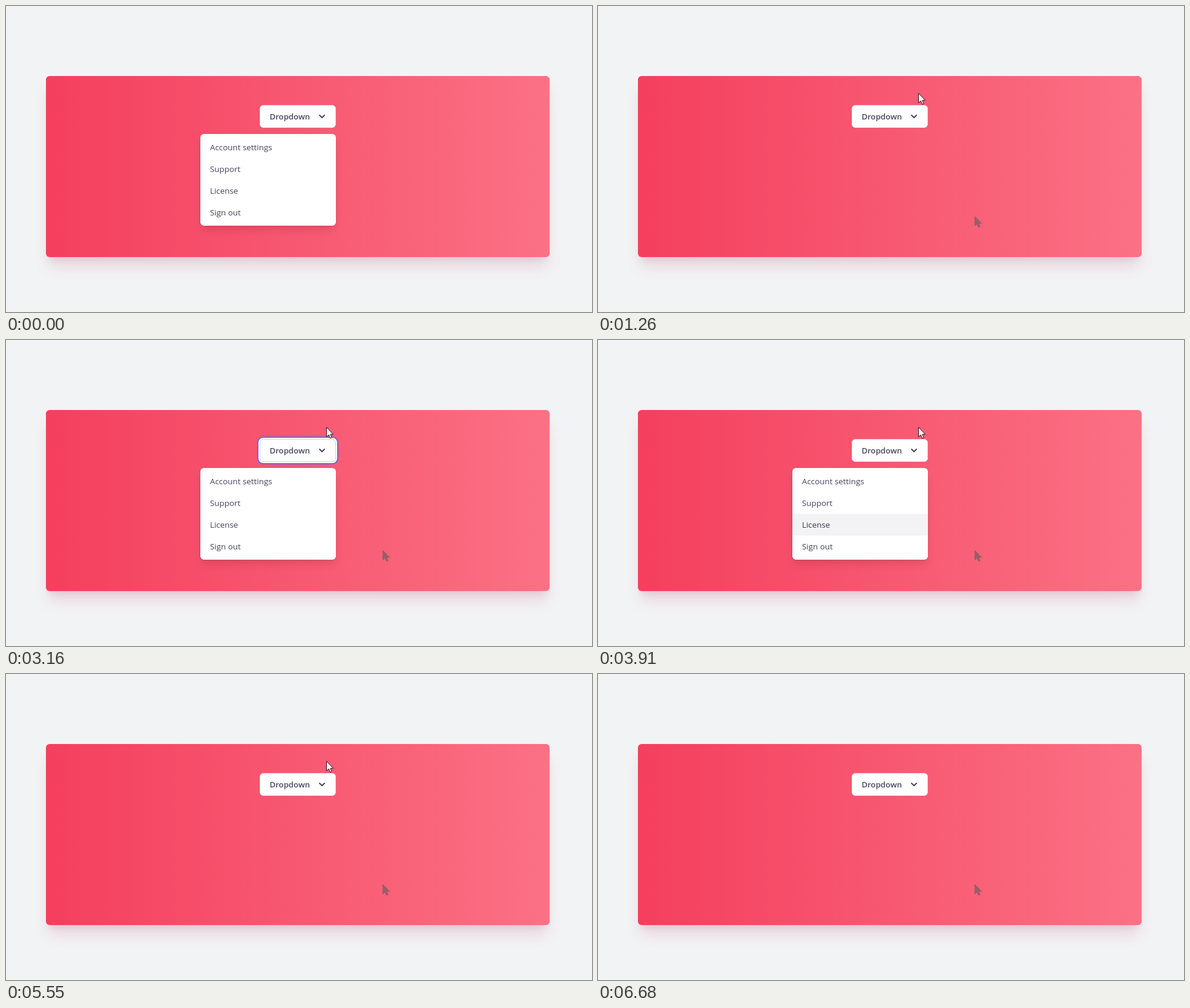
Animation of 968 by 507 pixels, one loop 7680 ms. Source, as an HTML page:

```html
<!DOCTYPE html>
<html lang="en">
<head>
<meta charset="utf-8">
<title>Dropdown menu</title>
<style>
  html, body { margin: 0; width: 100%; height: 100%; overflow: hidden; background: #f2f3f5; }
  .box { position: absolute; box-sizing: border-box; border-radius: 6px; }
  #card {
    left: 66px; top: 116px; width: 832px; height: 300px;
    background: linear-gradient(90deg, #f43f5e, #fb7185);
    box-shadow: 0 20px 25px -5px rgba(190, 40, 90, .15), 0 10px 10px -5px rgba(150, 30, 70, .08);
  }
  #button {
    left: 419px; top: 164px; width: 126px; height: 38px;
    background: #fff; border: 1px solid #d6d3dc;
    box-shadow: 0 1px 2px rgba(0, 0, 0, .05);
  }
  #button.focus { box-shadow: 0 0 0 2px #fff, 0 0 0 4px #6366f1; }
  #menu {
    left: 321px; top: 212px; width: 224px; height: 152px; background: #fff;
    box-shadow: 0 0 0 1px rgba(0, 0, 0, .05), 0 10px 15px -3px rgba(0, 0, 0, .1), 0 4px 6px -2px rgba(0, 0, 0, .05);
  }
  svg { position: absolute; left: 0; top: 0; }
  text { font: 13.4px "Open Sans", "Noto Sans", sans-serif; fill: #45425a; }
  #label { font-size: 13.2px; font-weight: 600; fill: #4a4562; }
</style>
</head>
<body>
<div id="card" class="box"></div>
<div id="button" class="box"></div>
<div id="menu" class="box"></div>
<svg width="968" height="507" viewBox="0 0 968 507">
  <defs>
    <path id="arrow" d="M.5 .5V16.5L4.2 13.2L6.6 18.9L9.1 17.8L6.8 12.3H11.6Z"/>
  </defs>
  <text id="label" x="435.5" y="188">Dropdown</text>
  <path d="M518 181L522 185L526 181" fill="none" stroke="#4a4562" stroke-width="2" stroke-linecap="round" stroke-linejoin="round"/>
  <g id="items"></g>
  <use id="trace" href="#arrow" x="622" y="348" fill="#965f66" stroke="#965f66"/>
  <use id="cursor" href="#arrow" fill="#fdeff1" stroke="#21171c" stroke-linejoin="round"/>
</svg>
<script>
const LOOP = 7680;
const ROW = 36;
const $ = id => document.getElementById(id);
const within = (t, from, to) => t >= from && t < to;

// Keyboard focus inside the menu: [time, row]
const focusSteps = [[3410, 0], [3660, 1], [3910, 2], [4030, 3], [4300, 2], [4550, 1], [4670, 0]];
// The pointer's way in, one point per step
const path = [[622, 348], [604, 297], [578, 236], [551, 174], [532, 127], [529, 105], [529, 131]];

function add(tag, parent, attributes) {
  const node = document.createElementNS("http://www.w3.org/2000/svg", tag);
  for (const key in attributes) node.setAttribute(key, attributes[key]);
  return parent.appendChild(node);
}

const rows = ["Account settings", "Support", "License", "Sign out"].map((name, i) => {
  const back = add("rect", $("items"), { x: 321, y: 216 + i * ROW, width: 224, height: ROW, fill: "#f3f3f5" });
  const text = add("text", $("items"), { x: 337, y: 239 + i * ROW });
  text.textContent = name;
  return { back, text };
});

function show(node, visible) {
  node.style.display = visible ? "" : "none";
}

function pointerAt(t) {
  if (within(t, 130, 1010)) return path[Math.min(6, Math.floor((t - 130) / (740 / 6)))];
  if (within(t, 1260, 6550)) return [529, 144];
  if (within(t, 6550, 6680)) return [730, 465];
  return null;
}

function draw(t) {
  const open = t < 1010 || within(t, 3160, 5550);
  show($("menu"), open);
  show($("items"), open);
  $("button").classList.toggle("focus", within(t, 2760, 3410));

  const step = focusSteps.filter(([time]) => t >= time).pop();
  rows.forEach(({ back, text }, i) => {
    const active = !!step && step[1] === i;
    show(back, active);
    text.style.fill = active ? "#39344c" : "";
  });

  show($("trace"), t >= 130);
  const point = pointerAt(t);
  show($("cursor"), point);
  if (point) {
    $("cursor").setAttribute("x", point[0]);
    $("cursor").setAttribute("y", point[1]);
  }
}

const start = performance.now();
function tick() {
  draw((performance.now() - start) % LOOP);
  requestAnimationFrame(tick);
}
tick();
</script>
</body>
</html>
```
